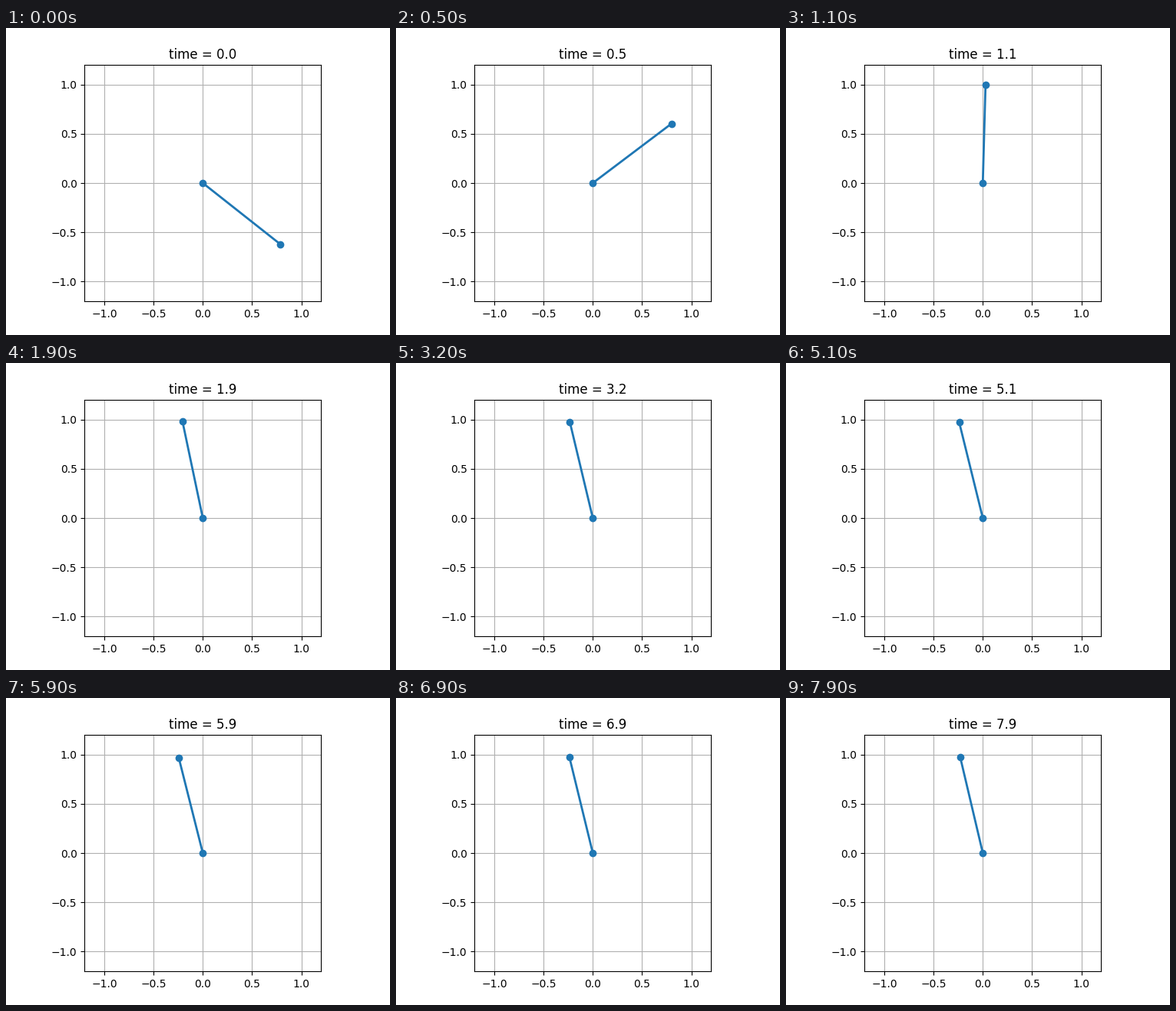
A matplotlib script for the animation above (8000 ms loop, 500x400 px).

```python
import numpy as np
import matplotlib.pyplot as plt
from matplotlib.animation import FuncAnimation

DT = 0.1
FRAMES = 80
START = -128.3        # degrees from upright, counter-clockwise positive
REST = 13.7
SLOW, FAST = 2.7, 4.95  # decay rates of the overdamped swing-up


def lean(t):
    """Angle from upright: overdamped rise, then a faint sway about rest."""
    gap = (FAST * np.exp(-SLOW * t) - SLOW * np.exp(-FAST * t)) / (FAST - SLOW)
    sway = 0.45 * np.clip(t - 1.9, 0, 1) * np.cos(np.pi / 2 * (t - 5.9))
    return np.radians(REST + (START - REST) * gap + sway)


fig = plt.figure(figsize=(5, 4), dpi=100)
ax = fig.add_subplot(autoscale_on=False, xlim=(-1.2, 1.2), ylim=(-1.2, 1.2))
ax.set_aspect("equal")
ax.grid()
rod, = ax.plot([], [], "o-", lw=2)
title = ax.set_title("")


def update(i):
    t = i * DT
    a = lean(t)
    rod.set_data([0, -np.sin(a)], [0, np.cos(a)])
    title.set_text(f"time = {t:.1f}")
    return rod, title


anim = FuncAnimation(fig, update, frames=FRAMES, interval=1000 * DT,
                     repeat=True, repeat_delay=0, blit=False)
plt.show()
```
